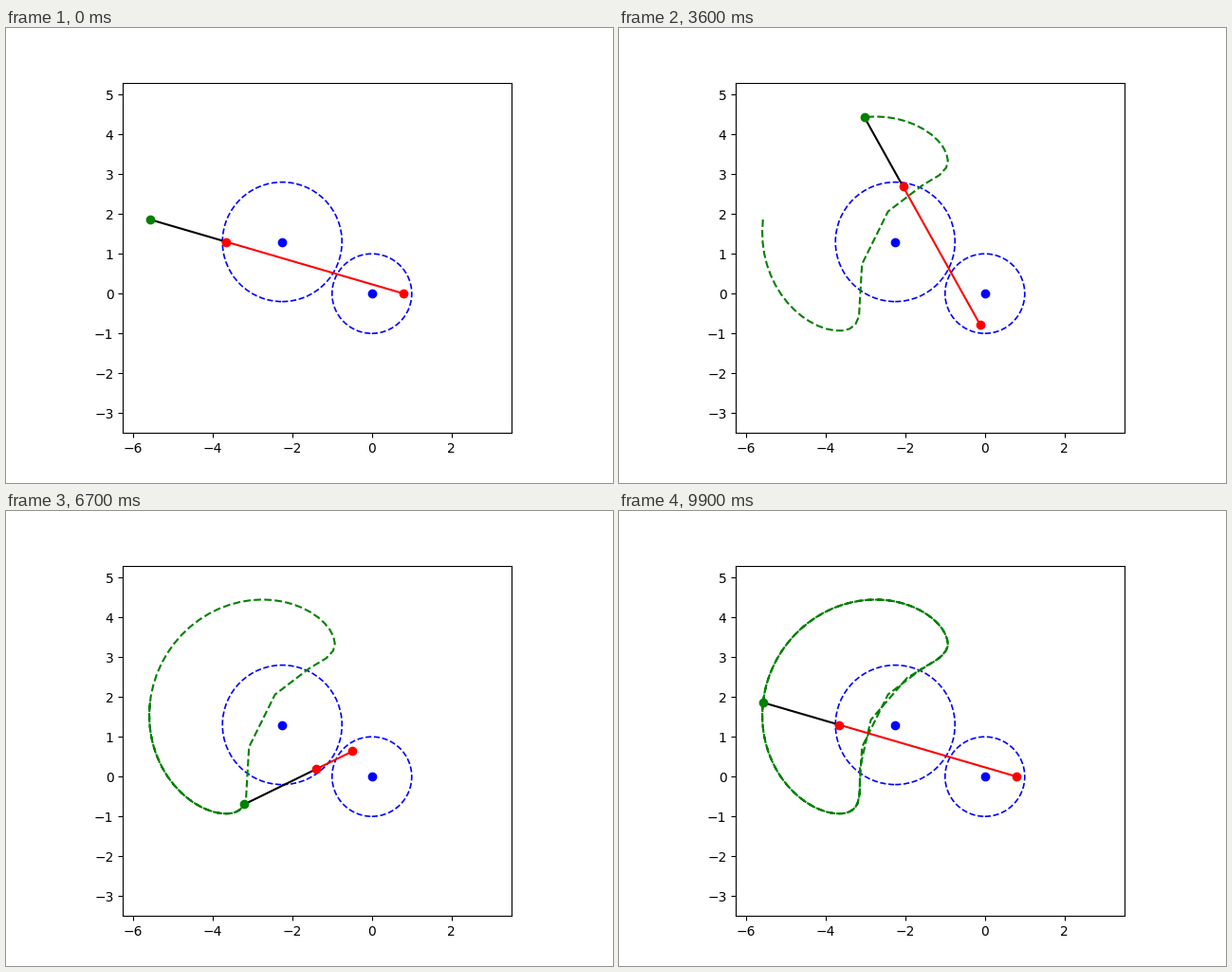
Write a matplotlib script that moves like this. It is 640 px wide and 480 px high and loops after 10000 ms.

```python
import numpy as np
import matplotlib.pyplot as plt
from matplotlib.animation import FuncAnimation
from matplotlib.patches import Circle

FRAMES = 100
INTERVAL = 100

R1, R2 = 1.0, 1.5        # wheel radii
CRANK1, CRANK2 = 0.8, 1.4  # pin distances from the wheel centres
ARM = 2.0                # rod length beyond the second pin
MARGIN = 2.5

c1 = np.zeros(2)
c2 = 2.6 * np.array([np.cos(np.radians(150)), np.sin(np.radians(150))])

# Both pins turn at the same rate, half a turn apart.
theta = np.linspace(0, 4 * np.pi, FRAMES)
turn = np.column_stack([np.cos(theta), np.sin(theta)])
pin1 = c1 + CRANK1 * turn
pin2 = c2 - CRANK2 * turn
rod = pin2 - pin1
tip = pin2 + ARM * rod / np.linalg.norm(rod, axis=1, keepdims=True)

fig, ax = plt.subplots(figsize=(6.4, 4.8), dpi=100)
ax.set_aspect("equal")
ax.set_xlim(c2[0] - R2 - MARGIN, c1[0] + R1 + MARGIN)
ax.set_ylim(c1[1] - R1 - MARGIN, c2[1] + R2 + MARGIN)

for centre, radius in ((c1, R1), (c2, R2)):
    ax.add_patch(Circle(centre, radius, fill=False, ec="b", ls="--", lw=1.2))
    ax.plot(*centre, "bo")

trail, = ax.plot([], [], "g--")
arm, = ax.plot([], [], "k-")
link, = ax.plot([], [], "ro-")
end, = ax.plot([], [], "go")


def update(i):
    trail.set_data(*tip[:i + 1].T)
    arm.set_data(*np.array([pin2[i], tip[i]]).T)
    link.set_data(*np.array([pin1[i], pin2[i]]).T)
    end.set_data(*tip[i:i + 1].T)
    return trail, arm, link, end


anim = FuncAnimation(fig, update, frames=FRAMES, interval=INTERVAL,
                     repeat=True, repeat_delay=0)
plt.show()
```
